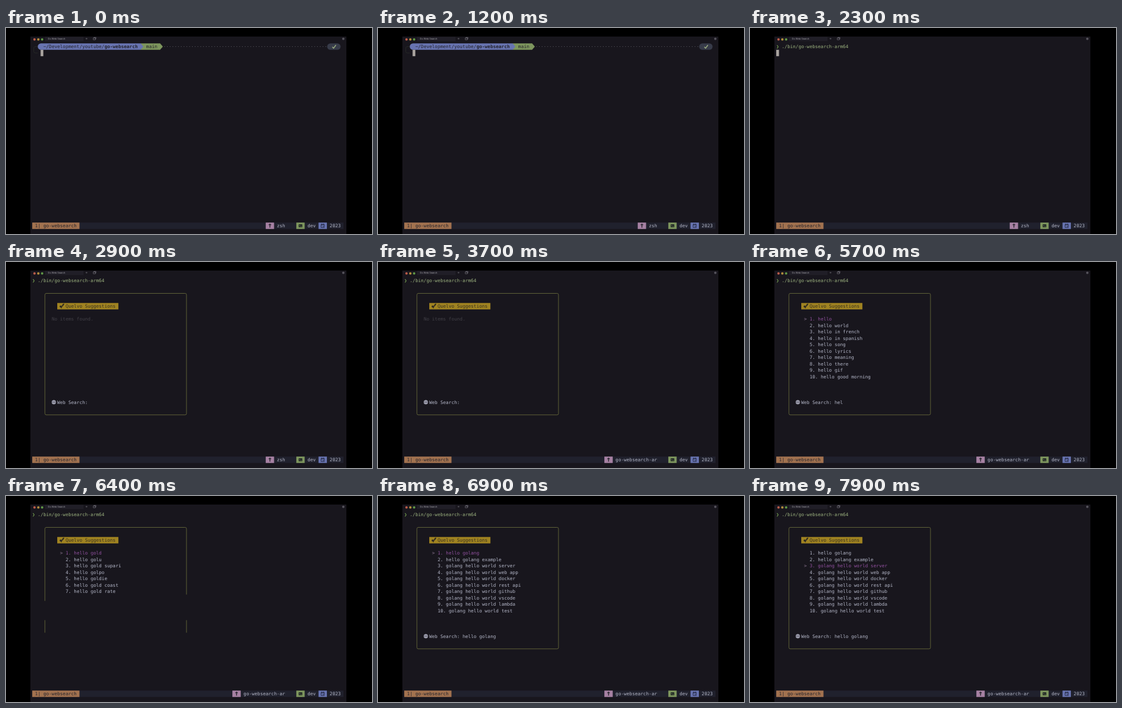
An HTML page for the animation above (8000 ms loop, 600 by 338 pixels).

```html
<!DOCTYPE html>
<html lang="en">
<head>
<meta charset="utf-8">
<style>
html, body { margin: 0; width: 100%; height: 100%; overflow: hidden; background: #000; }
svg { display: block; width: 600px; height: 338px; }
text { font: 7.57px "DejaVu Sans Mono", monospace; text-rendering: geometricPrecision; white-space: pre; }
.tab { font: 3.9px Inter, sans-serif; }
</style>
</head>
<body>
<svg viewBox="0 0 600 338">
  <rect x="40" y="14" width="518" height="324" fill="#18161d"/>
  <g id="chrome"></g>
  <g id="screen"></g>
</svg>
<script>
const LOOP = 8000, CELL = 4.557, ROW = 10.5;
const TYPE = 1300, ENTER = 2150, APP = 2600, STATUS = 3000, SEARCH = 5400;
const COMMAND = './bin/go-websearch-arm64', QUERY = 'hello golang';
const INK = '#b3b6c7', DARK = '#24232c', GREEN = '#7d955d', BLUE = '#6874b1';

const general = ['hello', 'hello world', 'hello in french', 'hello in spanish', 'hello song',
  'hello lyrics', 'hello meaning', 'hello there', 'hello gif', 'hello good morning'];
const partial = ['gold', 'golu', 'gold supari', 'golpo', 'goldie', 'gold coast', 'gold rate']
  .map(word => 'hello ' + word);
const complete = ['hello golang', 'hello golang example',
  ...['server', 'web app', 'docker', 'rest api', 'github', 'vscode', 'lambda', 'test']
    .map(word => 'golang hello world ' + word)];

const x = col => 43 + col * CELL;
const y = row => 30.5 + row * ROW;
const text = (col, row, str, fill = INK, extra = '') =>
  `<text x="${x(col)}" y="${y(row) + 2.7}" fill="${fill}" ${extra}>${str}</text>`;
const block = (col, row, cols, fill) =>
  `<rect x="${x(col)}" y="${y(row) - 5.25}" width="${cols * CELL}" height="${ROW}" fill="${fill}"/>`;
const line = (d, stroke, width = 1) =>
  `<path d="${d}" fill="none" stroke="${stroke}" stroke-width="${width}"/>`;
const shape = (d, fill) => `<path d="${d}" fill="${fill}"/>`;
const dot = (cx, cy, r, fill) => `<circle cx="${cx}" cy="${cy}" r="${r}" fill="${fill}"/>`;

function chrome() {
  return '<rect x="64" y="14.5" width="63" height="7" fill="#201e27"/>' +
    dot(46.7, 18.7, 2, '#b85b4a') + dot(53, 18.7, 2, '#b08c3c') + dot(59.2, 18.7, 2, '#5f9546') +
    '<text class="tab" x="68.5" y="19.2" fill="#a5a4aa">Go Web Search</text>' +
    line('M130.5 17.5h3M132 16v3', '#77757e', .5) +
    line('M143 16.5h3.5v2.8h-3.5zM144 16v-.6h3.4v2.8h-.7', '#85838b', .6) +
    dot(553, 17.7, 2, '#55535c');
}

function prompt(typed) {
  const end = x(39), tip = x(46);
  return line('M52 30.5h-4q-2.5 0 -2.5 2.5v5.5q0 2.5 2.5 2.5h4', '#2b3029', .7) +
    shape(`M${end} 25.2H${tip}l4.5 5.3l-4.5 5.3H${end}z`, GREEN) +
    shape(`M57.4 25.2H${end}l4.5 5.3l-4.5 5.3H57.4a5.3 5.3 0 0 1 0 -10.6z`, BLUE) +
    text(4, 0, '~/Development/youtube/<tspan font-weight="bold">go-websearch</tspan>', DARK) +
    text(41, 0, 'main', DARK) +
    `<path d="M${x(47.5)} 30.5H526" stroke="#5a5961" stroke-width="1" stroke-dasharray="1 ${CELL - 1}"/>` +
    '<rect x="526.5" y="25.2" width="22" height="10.6" rx="5.3" fill="#373b49"/>' +
    line('M535 31l2 2.2l3.8 -5.2', '#9cae82', 1.4) +
    text(3, 1, typed, '#9cb27f') + block(3 + typed.length, 1, 1, '#a9a39f');
}

function statusBar(name) {
  const left = 94 - name.length - 4;
  const center = x(left - 1.5), key = x(96.5), cal = x(104.5);
  return block(0, 28, 112, '#20212d') + block(0, 28, 17, '#a2724f') +
    text(1, 28, '1| go-websearch', DARK) +
    block(left - 3, 28, 3, '#a681a3') +
    line(`M${center} 321v6.5M${center - 2} 322.8h4`, '#302a36', 1.5) +
    text(left + 1, 28, name) +
    block(95, 28, 3, GREEN) +
    `<rect x="${key - 3}" y="322" width="6" height="5" rx=".7" fill="#252c29"/>` +
    line(`M${key - 2} 323.3l1.3 1.1l-1.3 1.1M${key} 325.7h2`, GREEN, .6) +
    text(99, 28, 'dev') +
    block(103, 28, 3, BLUE) +
    line(`M${cal - 2.6} 322.3h5.2v5h-5.2zM${cal - 2.6} 323h5.2M${cal - 1.5} 320.9v1.5M${cal + 1.5} 320.9v1.5`, '#252a43', .9) +
    `<rect x="${cal}" y="325" width="1.4" height="1.2" fill="#252a43"/>` +
    text(107, 28, '2023');
}

function searchBox(query, list, selected, broken) {
  const border = broken
    ? 'M63.8 172.2V53.7q0 -2.2 2.2 -2.2H293.7q2.2 0 2.2 2.2V161.7M63.8 203.7v20.6M295.9 203.7v20.6'
    : 'M66 51.5H293.7q2.2 0 2.2 2.2V248.6q0 2.2 -2.2 2.2H66q-2.2 0 -2.2 -2.2V53.7q0 -2.2 2.2 -2.2z';
  let out = line(border, '#66683a', .9) + block(9, 4, 22, '#a08321') +
    shape('M88 72l2.2 -.8l.8 1.4l2.5 -4l2 -.3l-.4 2l-3.2 3.5l-1 2.7l-1.1 -1.8l-1.8 -.7z', '#302b21') +
    text(12, 4, 'Quelvo Suggestions', '#39311f');
  if (!list.length) out += text(7, 6, 'No items found.', '#424047');
  list.forEach((item, i) => {
    const active = i === selected;
    if (active) out += text(10, 6 + i, '&gt;', '#8d7893');
    out += text(12, 6 + i, `${i + 1}. ${item}`, active ? '#91519f' : INK);
  });
  if (!broken) {
    out += dot(78.4, 230, 3.5, '#a3a4b4') +
      line('M76 229h1.8v1.8h-1.8zM79 229h1.8v1.8h-1.8z', '#565563', .6) +
      text(9, 19, 'Web Search: ' + query);
  }
  return out;
}

function queryLength(t) {
  if (t < SEARCH) return 0;
  if (t < 6520) return Math.min(9, 1 + Math.floor((t - SEARCH) / 115));
  return Math.min(12, 10 + Math.floor((t - 6520) / 120));
}

function screen(t) {
  const bar = statusBar(t < STATUS ? 'zsh' : 'go-websearch-ar');
  if (t < ENTER) {
    const count = Math.max(0, Math.min(COMMAND.length, Math.floor((t - TYPE) / 31)));
    return bar + prompt(COMMAND.slice(0, count));
  }
  const head = bar + text(0, 0, '❯', '#79a653') + text(2, 0, COMMAND, '#9cb27f');
  if (t < APP) return head + block(0, 1, 1, '#a9a39f');
  const n = queryLength(t);
  const list = t >= 6850 ? complete : n >= 9 ? partial : n ? general : [];
  const selected = t < 7250 ? 0 : t < 7600 ? 1 : 2;
  return head + searchBox(QUERY.slice(0, n), list, selected, t >= 6350 && t < 6490);
}

const view = document.getElementById('screen');
document.getElementById('chrome').innerHTML = chrome();
let shown = '';
const start = performance.now();
function tick() {
  const next = screen((performance.now() - start) % LOOP);
  if (next !== shown) view.innerHTML = shown = next;
  requestAnimationFrame(tick);
}
tick();
</script>
</body>
</html>
```
